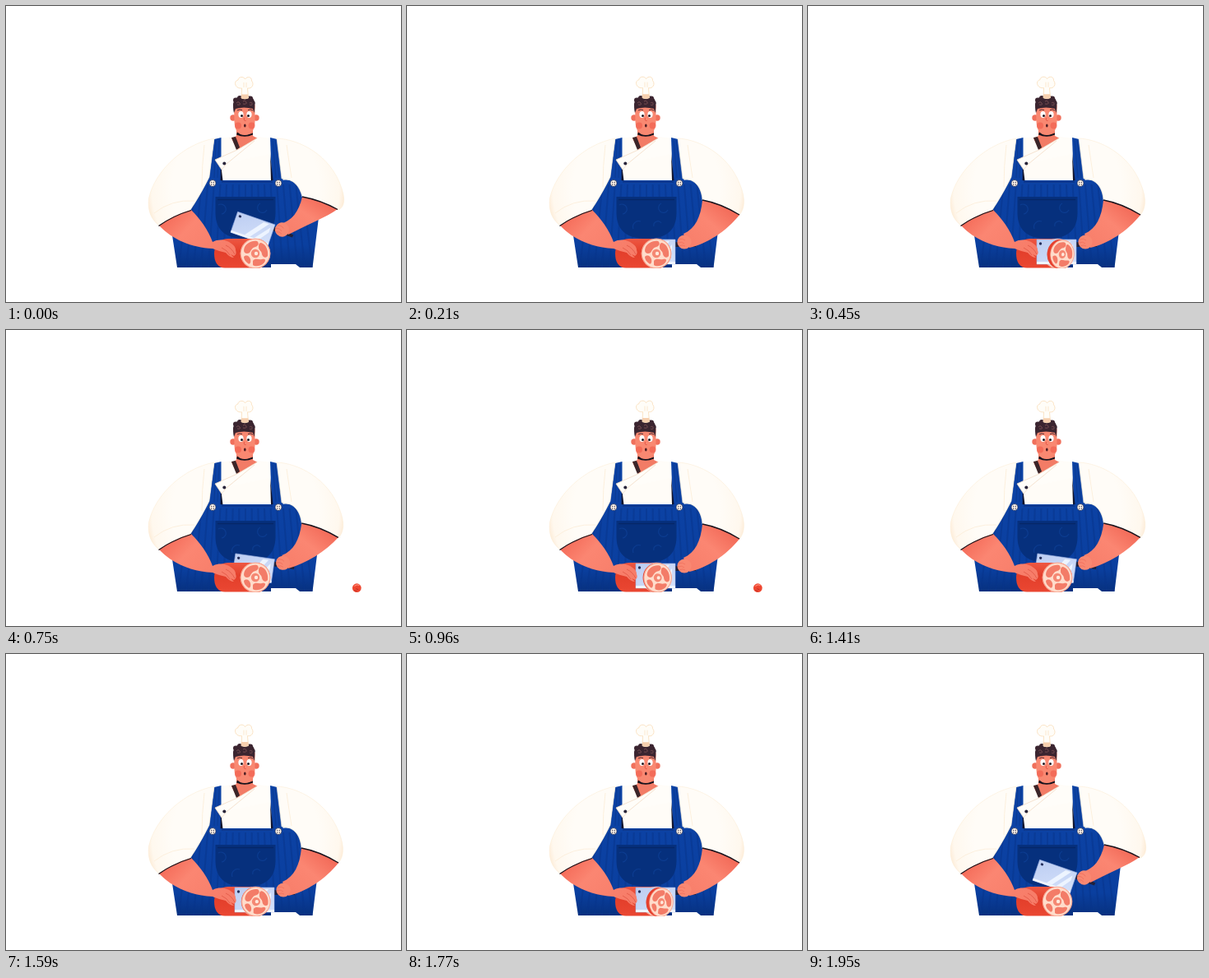
Recreate the animation shown at these times as an HTML page. Size 480 by 360 pixels, loop 1.98 s.

```html
<!DOCTYPE html>
<html lang="en">
<head>
<meta charset="utf-8">
<title>Chef slicing ham</title>
<style>
html, body { margin: 0; width: 100%; height: 100%; overflow: hidden; background: #fff; }
svg { display: block; width: 480px; height: 360px; }
</style>
</head>
<body>
<svg viewBox="0 0 480 360">
  <defs>
    <radialGradient id="cloth" gradientUnits="userSpaceOnUse" cx="291" cy="222" r="124">
      <stop offset=".72" stop-color="#fffcf7"/><stop offset=".92" stop-color="#fff8ee"/><stop offset="1" stop-color="#fce5cb"/>
    </radialGradient>
    <linearGradient id="denim" x1="0" y1="0" x2="0" y2="1">
      <stop offset="0" stop-color="#0c42a4"/><stop offset=".75" stop-color="#0a3f9f"/><stop offset="1" stop-color="#07317f"/>
    </linearGradient>
    <linearGradient id="armL" x1="0" y1="0" x2="1" y2=".6">
      <stop offset="0" stop-color="#f2614f"/><stop offset=".45" stop-color="#fb8672"/><stop offset="1" stop-color="#f77d69"/>
    </linearGradient>
    <linearGradient id="armR" x1="1" y1="0" x2="0" y2="1">
      <stop offset="0" stop-color="#ee5c4b"/><stop offset=".5" stop-color="#fb8672"/><stop offset="1" stop-color="#f77d69"/>
    </linearGradient>
    <linearGradient id="ham" x1="0" y1="0" x2="0" y2="1">
      <stop offset="0" stop-color="#ee5843"/><stop offset=".45" stop-color="#e33f2b"/><stop offset="1" stop-color="#ea4732"/>
    </linearGradient>
    <linearGradient id="steel" x1="0" y1="0" x2="1" y2="1">
      <stop offset="0" stop-color="#bccdf2"/><stop offset="1" stop-color="#d5e1fa"/>
    </linearGradient>
    <clipPath id="table"><path d="M160 60H470V319H160Z"/></clipPath>
    <clipPath id="apronClip"><use href="#apronShape"/></clipPath>
    <g id="cut">
      <circle r="18.300" fill="#f9a894"/>
      <circle r="17.200" fill="#ffdccb"/>
      <path d="M-14-4C-13-12-5-16 2-15C5-13 4-9 0-8C-4-7-5-4-7-1C-10 1-14 0-14-4ZM7-13C13-11 16-4 15 3C13 6 9 5 8 1C8-3 4-4 4-7C4-10 4-13 7-13ZM-14 4C-11 1-7 3-6 7C-5 11-7 14-9 12C-12 10-14 7-14 4ZM-3 9C0 5 4 8 8 7C13 6 13 9 10 12C6 16-1 16-3 14Z" fill="#f37c68"/>
      <circle cx="0" cy="0" r="5.200" fill="#f58873"/>
      <circle cx="1" cy="0" r="2.200" fill="#ffe9dc"/>
    </g>
  </defs>

  <g clip-path="url(#table)">
    <!-- shirt body and neck -->
    <path d="M252 162L274 159H306L330 162L336 216H248Z" fill="#fffcf7"/>
    <path d="M280 148H300V158L306 161L281 175L274 161L280 158Z" fill="#f27c66"/>
    <path d="M274 160L279 159L284 172L280 175Z" fill="#3a2529"/>
    <path d="M281 153.500Q290 159 300 154.500V156.500Q290 161 280 156.500Z" fill="#15131d"/>

    <!-- head -->
    <g id="head">
      <circle cx="276" cy="136" r="3.700" fill="#f0705c"/>
      <circle cx="304" cy="136" r="3.700" fill="#f0705c"/>
      <path d="M277 120H302.500V141C302 151 298 157 290 157C282 157 278 151 277.500 141Z" fill="#f98871"/>
      <circle cx="282" cy="145.500" r="4" fill="#f16150" opacity=".7"/>
      <circle cx="298.500" cy="145.500" r="4" fill="#f16150" opacity=".7"/>
      <path d="M277 130C275 121 276 112 282 111C287 108 294 108 298 111C303 112 303 123 301.500 130L300 125Q289 122 279 125Z" fill="#3b2530"/>
      <g fill="#3b2530">
        <circle cx="279" cy="114.500" r="3"/><circle cx="279" cy="120" r="3"/><circle cx="284" cy="112" r="3"/><circle cx="297" cy="112.500" r="3"/><circle cx="300" cy="118" r="2.700"/>
      </g>
      <path d="M280 118q2-3 4 0t-3 2M288 116q3-2 4 1t-4 2M296 118q3-2 3 1t-3 1" fill="none" stroke="#7a5154" stroke-width=".9"/>
      <ellipse cx="285.500" cy="132" rx="3.100" ry="4" fill="#fff"/>
      <ellipse cx="295.500" cy="132" rx="3.100" ry="4" fill="#fff"/>
      <circle cx="286.500" cy="133.500" r="1.500" fill="#221820"/>
      <circle cx="294.500" cy="133.500" r="1.500" fill="#221820"/>
      <path d="M281 127Q284 125 287 126.500M294 126.500Q297 125 300 127" fill="none" stroke="#3b2530" stroke-width=".9"/>
      <path d="M289.500 136Q288.500 140 291.500 139.500" fill="none" stroke="#e55545" stroke-width="1"/>
      <ellipse cx="290.300" cy="145.500" rx="1.300" ry="2" fill="#4a1c22"/>
      <g id="hat">
        <path d="M286 112L286.500 100C278 101 276 91 282 90C282 86 289 85 290.500 89C293 85 299 86 298.500 91C302 95 299 101 293.500 100L294.500 112Q290 114 286 112Z" fill="#fffdf8" stroke="#fae0bf" stroke-width=".9"/>
        <path d="M286 107.500H294.300L294.500 112Q290 114 286 112Z" fill="#f6cfae"/>
        <path d="M289 93V99M292 93V99" stroke="#fae0bf" stroke-width=".7"/>
      </g>
    </g>

    <!-- dungarees -->
    <path id="apronShape" d="M247 212H336C352 209 362 222 362 240L380 257L372.500 318H357L352 314H322V318H208L202 279L224 248C232 236 239 224 247 208Z" fill="url(#denim)"/>
    <g id="ribs" clip-path="url(#apronClip)" stroke="#08348a" stroke-width="2" opacity=".5"></g>
    <path d="M253 162L261.500 160V214H246Z" fill="#0c42a4"/>
    <path d="M321 160L329.500 162L337 214H323Z" fill="#0c42a4"/>
    <path d="M255 163L253 209M259 163L257 209M324 163L328 209M327 163L332 209" stroke="#0a3a92" stroke-width="1"/>
    <path d="M261 192L260.500 212L263.500 212.500ZM321 180L324.500 212L322 212.500Z" fill="#10142e"/>
    <path d="M254.500 232H327.500V252C327 274 314 283 291 283C268 283 255 274 254.500 252Z" fill="#06307d"/>
    <path d="M257 235.500H325" stroke="#052768" stroke-width="1.500"/>
    <path d="M258 242a6 6 0 1 1 4 11M284 262a7 7 0 0 0-9 9M309 240a6 6 0 1 0 8 8M300 268a5 5 0 0 1 9-4" fill="none" stroke="#0c3c90" stroke-width="1.200"/>
    <path d="M262 214H324" stroke="#0a2f7c" stroke-width="1.200"/>
    <g id="buttons"></g>

    <!-- lapel -->
    <path d="M306 160L281 175L254 187L262 199L272 190L321 180V161Z" fill="#fffdf9"/>
    <path d="M305 161L281 175L254 187L262 199L268 192L302 164" fill="none" stroke="#f3dcc6" stroke-width=".8"/>
    <circle cx="265.300" cy="191.500" r="2" fill="#29253a"/>

    <!-- sleeve on the left -->
    <path d="M253 161C216 168 181 200 173.500 234C172 249 176 259 186 267Q204 254 224 248C232 236 239 224 247 208Z" fill="url(#cloth)" stroke="#fcecd6" stroke-width=".6"/>
    <path d="M241 169Q238 194 238 220M180 252Q201 235 229 237" fill="none" stroke="#fbecd7" stroke-width=".8"/>

    <g id="meat">
      <path d="M303 283H270C258 283 253 292 253 301C253 311 257 318.500 266 318.500H303Z" fill="url(#ham)"/>
      <use href="#cut" x="303" y="301"/>
    </g>
    <g id="knife">
      <path d="M-12 0L14 2V6L-12 6Z" fill="#20213a"/>
      <path d="M-59-3H-11V27H-59Z" fill="url(#steel)" stroke="#9fb4e4" stroke-width=".6"/>
      <path d="M-42 24L-25-1H-18L-35 24ZM-30 24L-15 3V10L-24 24Z" fill="#edf4ff"/>
      <path d="M-59 24H-11V27H-59Z" fill="#f0f5ff"/>
      <circle cx="-54.500" cy="2" r="1.700" fill="#26305c"/>
    </g>
    <g id="slice"></g>

    <!-- arm on the left -->
    <path d="M186 267Q204 254 225 248C237 260 246 273 251 287C258 283 268 284 274 289Q279 292 279 297Q281 302 277 304L273 302L277 306Q272 306 267 300Q258 298 251 295C226 294 202 284 186 267Z" fill="url(#armL)"/>
    <path d="M267 291Q274 294 278 302M262 294Q269 297 272 303" fill="none" stroke="#e45b4a" stroke-width=".9"/>
    <path d="M185.500 267.500Q203 255 225 248.500" fill="none" stroke="#17121c" stroke-width="1.200"/>

    <!-- arm on the right -->
    <path id="sleeve" fill="url(#cloth)" stroke="#fcecd6" stroke-width=".6"/>
    <path d="M341 169Q344 190 347 209" fill="none" stroke="#fbecd7" stroke-width=".8"/>
    <path id="arm" fill="url(#armR)"/>
    <path id="hem" fill="none" stroke="#17121c" stroke-width="1.300"/>
    <g id="hand">
      <circle r="8.600" fill="#f98872"/>
      <path d="M-7-3Q-2-5 1-2M-8 1Q-3-1 0 2M-6 5Q-2 3 1 5" fill="none" stroke="#f0705d" stroke-width=".8"/>
    </g>
  </g>

  <g id="tomato" transform="translate(426.300 313.700)">
    <circle r="5.400" fill="#ee4630"/>
    <path d="M-3-2Q0-5 3-3" fill="none" stroke="#ff8b75" stroke-width="1.200"/>
    <path d="M-1 1L2 2M-3 3L0 4" stroke="#bf2c22" stroke-width="1"/>
  </g>
</svg>
<script>
const LOOP = 1980, CHOP = 660, STEP = 30;
const el = id => document.getElementById(id);

// Phase (ms), then the values at that phase.
const lift = [[0, 1], [90, .25], [180, 0], [510, 0], [540, .2], [600, .9], [630, 1], [660, 1]];
// x, y, half width, half height, tilt, thickness
const fall = [
  [0, 303, 301, 18, 18, 0, 0],
  [240, 303, 301, 18, 18, 0, 0],
  [450, 309, 302, 14.5, 17.5, 7, 4],
  [480, 321, 307, 14, 13, 15, 5],
  [510, 334, 309.5, 18, 6, 9, 5],
  [570, 340, 326, 18, 5, 7, 5],
  [660, 340, 330, 18, 5, 7, 5]
];

// Raised and lowered shapes of the working arm
const poses = {
  sleeve: [
    "M329 161C356 162 395 181 408 222C412 234 412 244 404 248Q382 236 360 232C357 220 350 210 335 210Z",
    "M329 161C354 162 391 180 405 218C411 233 411 246 404 254Q381 240 359 236C358 222 351 210 335 210Z"],
  arm: [
    "M360 232Q382 236 403 247C389 257 366 266 343 278L333 265C347 262 356 250 360 232Z",
    "M359 236Q381 240 404 254C388 274 365 289 343 294L336 277C350 271 357 257 359 236Z"],
  hem: ["M360 232Q382 236 403 247.500", "M359 236Q381 240 404 254"]
};

const mix = (a, b, k) => a + (b - a) * k;

function track(keys, t) {
  let i = 1;
  while (i < keys.length - 1 && keys[i][0] < t) i++;
  const a = keys[i - 1], b = keys[i];
  const k = (t - a[0]) / (b[0] - a[0]);
  return a.slice(1).map((v, j) => mix(v, b[j + 1], k));
}

function mixPath(a, b, k) {
  const ends = b.match(/[\d.]+/g);
  let i = 0;
  return a.replace(/[\d.]+/g, v => mix(+v, +ends[i++], k).toFixed(2));
}

let ribs = "";
for (let x = 210; x < 380; x += 9) {
  const top = 291 + (x - 291) * .85;
  ribs += `<path d="M${top} 217L${x} 318"/>`;
}
el("ribs").innerHTML = ribs;
el("buttons").innerHTML = [251, 331].map(x =>
  `<circle cx="${x}" cy="215.500" r="4" fill="#fff7ed" stroke="#16234f" stroke-width=".7"/>` +
  [-1.3, 1.3].map(d => `<circle cx="${x + d}" cy="214.500" r=".7" fill="#423b4d"/><circle cx="${x + d}" cy="217" r=".7" fill="#423b4d"/>`).join("")
).join("");

function drawSlice(t) {
  const [x, y, rx, ry, tilt, depth] = track(fall, t);
  const flat = t > 465;
  const dx = flat ? 0 : -depth, dy = flat ? depth : 0;
  el("slice").innerHTML =
    `<g transform="translate(${x} ${y}) rotate(${tilt})">` +
    `<ellipse cx="${dx}" cy="${dy}" rx="${rx}" ry="${ry}" fill="#e5412f"/>` +
    `<use href="#cut" transform="scale(${rx / 18} ${ry / 18})"/></g>`;
}

function draw(time) {
  const now = Math.floor(time % LOOP / STEP) * STEP;
  const t = now % CHOP;
  const [up] = track(lift, t);
  const x = mix(337, 335.5, up), y = mix(287, 272, up);
  const tilt = 19 * up ** .6;

  for (const id in poses) el(id).setAttribute("d", mixPath(poses[id][1], poses[id][0], up));
  el("hand").setAttribute("transform", `translate(${x} ${y}) rotate(${tilt})`);
  // The raised blade leans back a little, so it looks shorter.
  el("knife").setAttribute("transform", `translate(${x + up} ${y}) rotate(${tilt}) scale(1 ${1 - .12 * up})`);
  el("hat").setAttribute("transform", `translate(0 ${-.4 * Math.sin(t / CHOP * Math.PI)})`);

  // The blade is in front of the ham only from the finished cut until it is lifted clear.
  const inFront = t >= 270 && t < 600;
  el(inFront ? "slice" : "meat").before(el("knife"));
  drawSlice(t);
  el("tomato").style.display = now >= 660 && now < 1140 ? "" : "none";
}

function tick(time) {
  draw(time);
  requestAnimationFrame(tick);
}
draw(0);
requestAnimationFrame(tick);
</script>
</body>
</html>
```
